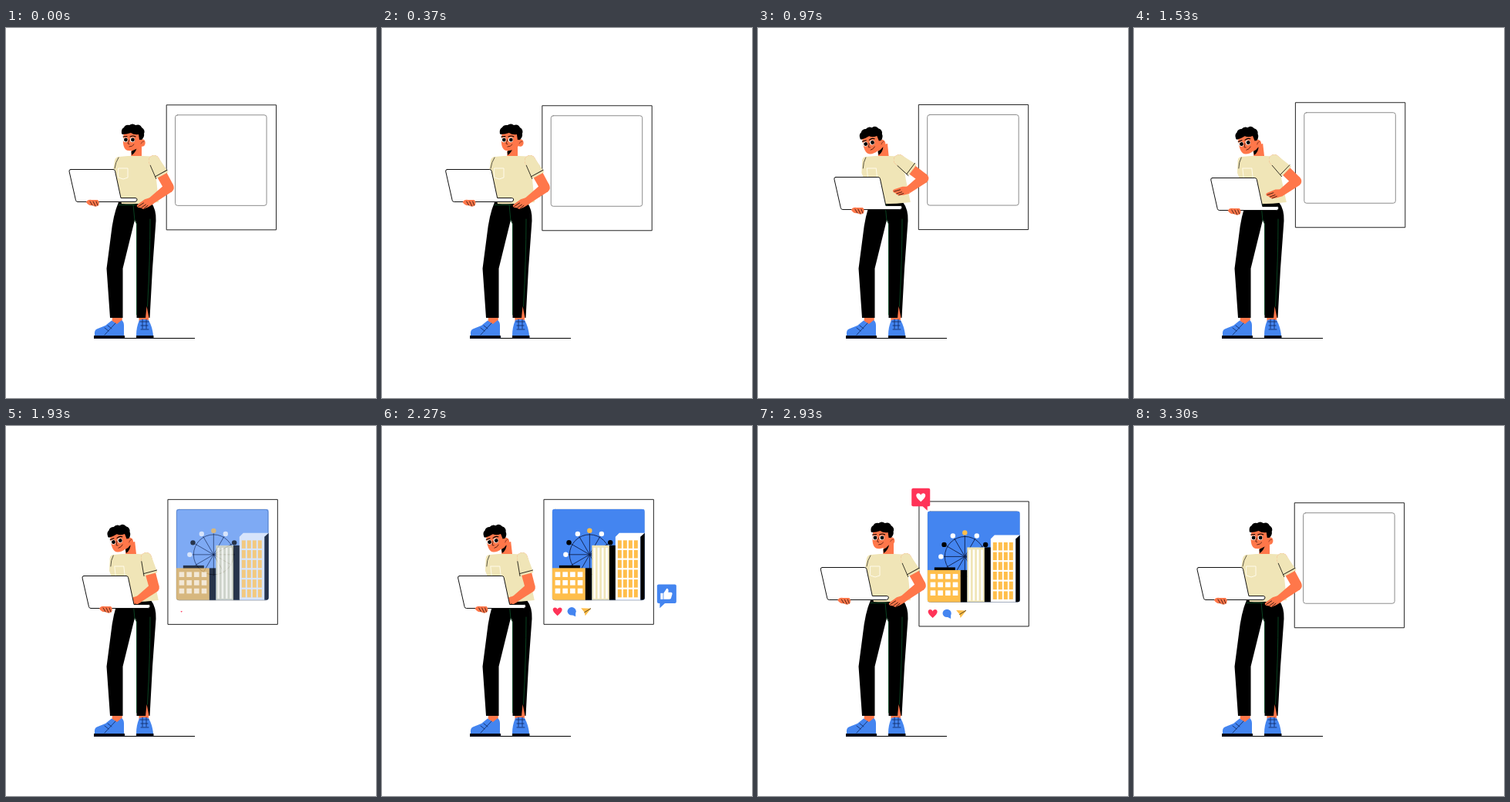
Animation of 480x480 px, one loop 3330 ms. Source, as an HTML page with a canvas:

```html
<!DOCTYPE html>
<html lang="en">
<head>
<meta charset="utf-8">
<title>Posting a picture</title>
<style>
html, body { margin: 0; width: 100%; height: 100%; overflow: hidden; background: #fff; }
canvas { display: block; width: 480px; height: 480px; }
</style>
</head>
<body>
<canvas id="stage" width="480" height="480"></canvas>
<script>
const c = document.getElementById('stage').getContext('2d');
const LOOP = 3330, TAU = 2 * Math.PI, DEG = Math.PI / 180;
const INK = '#000', SKIN = '#ff774a', SHIRT = '#f0e5b7', BLUE = '#4485f0',
      YELLOW = '#ffbe4b', RED = '#ff3358', WHITE = '#fff', GREEN = '#0b4a24',
      CREASE = '#2c2a20', FINGER = '#401a10';

// Timing: ramp rises from a to b; pulse rises, holds and falls
const ramp = (t, a, b) => {
  const x = Math.max(0, Math.min(1, (t - a) / (b - a)));
  return x * x * (3 - 2 * x);
};
const pulse = (t, a, b, d, e) => ramp(t, a, b) * (1 - ramp(t, d, e));
const lean = t => pulse(t, 400, 1100, 2330, 2930);
const sway = t => Math.sin(TAU * t / LOOP);

// Drawing helpers
function paint(path, fill, line, w = 1) {
  if (fill) { c.fillStyle = fill; c.fill(path); }
  if (line) { c.strokeStyle = line; c.lineWidth = w; c.stroke(path); }
}
const shape = (d, fill, line, w) => paint(new Path2D(d), fill, line, w);
const rect = (x, y, w, h, fill) => { c.fillStyle = fill; c.fillRect(x, y, w, h); };

function box(x, y, w, h, r, fill, line) {
  const p = new Path2D();
  p.roundRect(x, y, w, h, r);
  paint(p, fill, line);
}

function dot(x, y, r, fill, ry = r) {
  const p = new Path2D();
  p.ellipse(x, y, r, ry, 0, 0, TAU);
  paint(p, fill);
}

function at(x, y, draw, scale = 1, turn = 0) {
  if (scale <= 0) return;
  c.save();
  c.translate(x, y);
  c.rotate(turn);
  c.scale(scale, scale);
  draw();
  c.restore();
}

// Tapered limb along the x axis with a round start
function limb(len, r1, r2, fill) {
  const p = new Path2D();
  p.arc(0, 0, r1, Math.PI / 2, -Math.PI / 2);
  p.lineTo(len, -r2);
  p.lineTo(len, r2);
  p.closePath();
  paint(p, fill);
}

const heart = fill =>
  shape('M0 5.5C-4 2-6-.5-6-2.5C-6-6-1.5-6.5 0-3C1.5-6.5 6-6 6-2.5C6-.5 4 2 0 5.5Z', fill);

function windows(x, y, cols, rows, dx, dy, w, h, fill) {
  for (let i = 0; i < cols; i++)
    for (let j = 0; j < rows; j++) rect(x + i * dx, y + j * dy, w, h, fill);
}

function wheel() {
  const ring = new Path2D();
  ring.arc(0, 0, 26, 0, TAU);
  for (let i = 0; i < 12; i++) {
    ring.moveTo(0, 0);
    ring.lineTo(27 * Math.sin(i * TAU / 12), 27 * Math.cos(i * TAU / 12));
  }
  paint(ring, null, '#10204a', .9);
  [WHITE, INK, WHITE, YELLOW, WHITE, INK].forEach((col, i) => {
    const a = (i - 3) * TAU / 12;
    dot(31 * Math.sin(a), -31 * Math.cos(a), 3.2, col);
  });
}

function city() {
  c.save();
  const clip = new Path2D();
  clip.roundRect(221, 108, 120, 118, 3);
  c.clip(clip);
  rect(221, 108, 120, 118, BLUE);
  at(269.5, 167, wheel);

  rect(230, 181, 27, 4, INK);
  rect(221, 184.5, 43, 42, YELLOW);
  rect(264, 184.5, 8.5, 42, INK);
  windows(224.8, 189.5, 4, 3, 9.7, 10.7, 6.6, 6.6, WHITE);

  rect(272.5, 155, 23, 71, SHIRT);
  windows(274.5, 158, 4, 1, 5.3, 0, 2.6, 66, WHITE);
  rect(295, 155, 8.5, 71, INK);

  shape('M303 226V144L308 139H341L335.5 144V226Z', WHITE);
  shape('M335.5 144L341 139V226H335.5Z', INK);
  windows(306, 148.5, 4, 6, 7, 12.7, 5, 10.5, YELLOW);
  c.restore();
}

function icons(t) {
  const marks = [
    () => heart(RED),
    () => {
      dot(0, -.5, 5.6, BLUE, 5.2);
      shape('M0 4L5 6.5L5 0Z', BLUE);
    },
    () => {
      shape('M-6.5-4.5L6.5-4L-1 5.5L-2 1Z', YELLOW);
      shape('M-2 1L6-4', null, '#4a3510', .9);
    }
  ];
  marks.forEach((draw, i) =>
    at(227.8 + 18.5 * i, 241, draw, pulse(t, 1880 + i * 70, 2080 + i * 70, 3020, 3200)));
}

function likeBadge() {
  box(-12.5, -12.3, 25, 24.5, 2, BLUE);
  shape('M-9 11V18.5L-1 11Z', BLUE);
  rect(-8, -1, 3.2, 8, WHITE);
  shape('M-4-1L0-7Q3-7 2-2H6Q8-1 7 1L5.5 6Q5 7 3 7H-4Z', WHITE);
}

function heartBadge() {
  box(-12, -12, 24, 23.5, 2, RED);
  shape('M2 11L8.5 17V11Z', RED);
  heart(WHITE);
}

function card(t) {
  const k = Math.cos(TAU * (t - 450) / LOOP);
  c.save();
  c.translate(-1.2 - 1.1 * k, 2.5 + 2.8 * k);
  box(210.5, 95.5, 142, 162, 0, WHITE, '#222');
  box(221.5, 108.5, 118.5, 117.5, 3, WHITE, '#8c8c8c');
  c.globalAlpha = pulse(t, 1780, 2020, 3030, 3220);
  if (c.globalAlpha > 0) city();
  c.globalAlpha = 1;
  icons(t);
  at(369.5, 218, likeBadge, pulse(t, 2070, 2220, 2560, 2760));
  const overshoot = 1 + .2 * pulse(t, 2480, 2660, 2660, 2840);
  at(212.4, 90.3, heartBadge, overshoot * pulse(t, 2480, 2660, 3000, 3180));
  c.restore();
}

function legs() {
  rect(114, 402, 131, 1, INK);
  shape('M138 374H151L150 387H137ZM172 374H185V384H173Z', SKIN);
  shape('M115 399Q114 391 119 390L129 386L137 379.5L144 384L150 379Q153 381 153 386V399Z', BLUE);
  shape('M169 399Q169 388 173 379Q179 377 185 379Q190 388 191 399Z', BLUE);
  shape('M128 389L133 393M132 386L137 390M142 383L128 398' +
    'M174 381H185M175 386H184M175 391H185M177 378V390M182 378V390', null, '#12306e', .9);
  rect(114, 399, 40, 4, '#050a18');
  rect(169, 399, 22.5, 4, '#050a18');
  shape('M146 226H188Q195 235 194.5 250L190 312L186.5 376H169.5L169 252L167 249' +
    'L151.5 312L151.5 376H135L130.5 312L136 270Q139 242 146 226Z', INK);
  shape('M182.5 361L181 376H185.5Z', SKIN);
  shape('M146 229.5H168M165 229L167 250L169.5 254V372M187 248Q187 300 183.5 361', null, GREEN, .9);
}

// The torso shears sideways about the waist
function torso(p) {
  const k = .113 * p;
  c.save();
  c.transform(1, 0, k, 1, -228 * k, 0);
  shape('M163 153L176 150V170H162Z', SKIN);
  shape('M163 165L162.5 160Q167 158 170 154Q169 161 163 165Z', INK);
  shape('M138.5 188L141 172Q142 167 147 167L158 166H177L188 166.5Q193 168 194 180' +
    'L195 196L198 226Q174 229 150 228Z', SHIRT);
  shape('M146 182H158V194L152 196L146 194Z', null, '#fffbea');
  shape('M146 168Q142 174 141 182', null, '#4c4838', .9);
  c.restore();
}

function hand() {
  shape('M-2-4.5L6-6L13-6.5L16-3.5L19-2Q21 1 17 2L7 5L-2 4.5Z', SKIN);
  shape('M18-1L10 1M15-4L8-2M12-6L6-4', null, FINGER, .9);
}

// Two-joint arm: the upper arm lifts, then drops to type
function arm(t, p) {
  const type = pulse(t, 1430, 1800, 2330, 2930);
  const lift = pulse(t, 400, 970, 1430, 1800);
  const upper = (61 - 24 * lift + 14 * type) * DEG, fore = 143 * DEG;
  const x = 192 - 10 * p, y = 172 - p, reach = 29 - 4 * p;
  const ex = x + 40 * Math.cos(upper), ey = y + 40 * Math.sin(upper);
  const wx = ex + reach * Math.cos(fore), wy = ey + reach * Math.sin(fore);

  at(x, y, () => limb(40, 7, 6.5, SKIN), 1, upper);
  at(ex, ey, () => limb(reach, 6.5, 4.5, SKIN), 1, fore);
  at(wx, wy, hand, 1, (160 + 18 * lift) * DEG);
  at(x, y, () => {
    limb(22, 7, 9, SHIRT);
    shape('M3 7.2L22 9M19 9V-9', null, CREASE, .9);
  }, 1, upper);
}

// Drawn around the middle of the eyes
function head() {
  shape('M-11.5-7C-13 4-12 13-6 14C1 15 8 11 11 7L12-8L-10-10Z', SKIN);
  dot(12.5, 4, 4.2, SKIN, 4.8);
  shape('M11 5Q12 2 15 2', null, '#8a3520', .8);
  shape('M-14-8Q-15-14-11-16Q-9-20-4-19Q0-22 4-19Q10-21 12-16Q17-13 15-8' +
    'Q16-4 12 0H9L8-7Q2-6-2-9Q-7-7-13-7Z', INK);
  for (const x of [-9, 0]) {
    dot(x, 0, 3.1, WHITE);
    dot(x + .4, 0, 2.4, INK);
  }
  shape('M-12-4L-7-4.5M-3-4Q1-6 4-4', null, INK, 1.1);
  shape('M-4 0L-6 5L-4 5.5M-4 9Q0 9 2 6', null, '#5a2012', .9);
}

function laptop() {
  shape('M84 183.5H139Q141 183.5 141.5 185.5L149 220.5H168Q170.5 221 170 223Q169.5 225.5 167 225.5' +
    'H93Q91 225.5 90.5 223.5L82 186Q81.5 183.5 84 183.5Z', WHITE, '#111');
  shape('M104 226Q106 222 111 223H119Q122 226 120 230Q116 233 112 230Q107 231 104 226Z', SKIN);
  shape('M109 225L112 230M113 225L116 231M117 225L119 230', null, FINGER, .9);
}

function draw(t) {
  rect(0, 0, 480, 480, WHITE);
  c.lineJoin = c.lineCap = 'round';
  const p = lean(t), tilt = lean(t + 80), s = sway(t);
  card(t);
  legs();
  torso(p);
  at(164 - 16.2 * tilt + 5 * s * (1 - tilt), 145 + 3.6 * tilt, head, 1, -.23 * tilt);
  arm(t, p);
  at(17.5 * p + s, 11 * p, laptop);
}

const start = performance.now();
function tick() {
  draw((performance.now() - start) % LOOP);
  requestAnimationFrame(tick);
}
tick();
</script>
</body>
</html>
```
